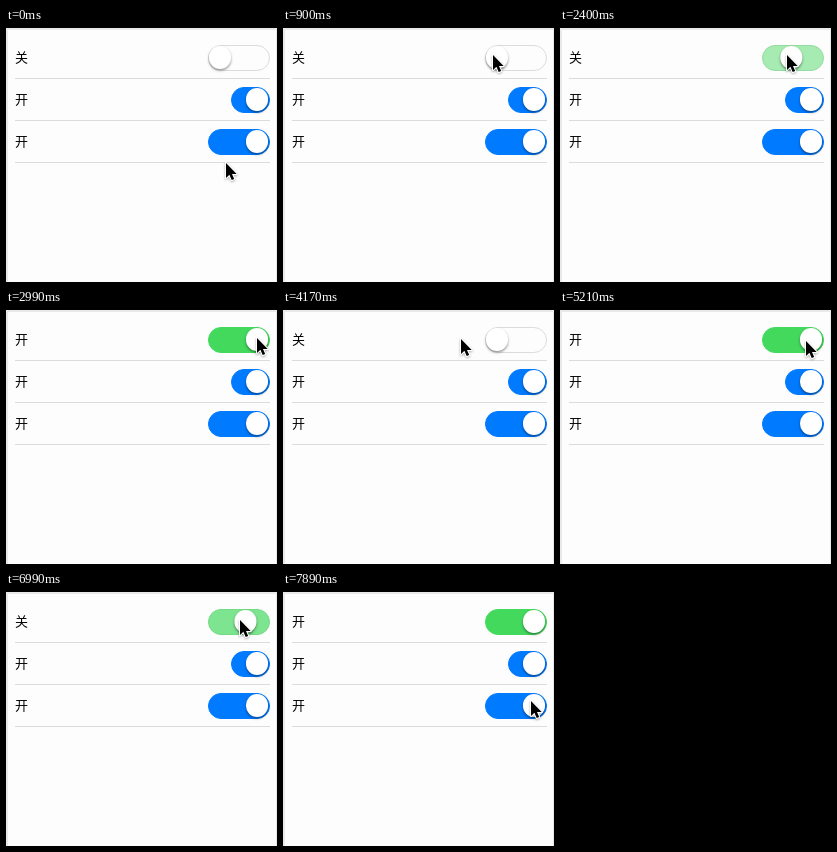
Recreate the animation shown at these times as an HTML page. Size 271 by 254 pixels, loop 8000 ms.

```html
<!DOCTYPE html>
<html lang="zh-CN">
<head>
<meta charset="utf-8">
<title>Switches</title>
<style>
  html, body { margin: 0; width: 100%; height: 100%; overflow: hidden; }
  #stage {
    position: relative; box-sizing: border-box; width: 271px; height: 254px; overflow: hidden;
    background: #fdfdfd; border: solid #e9e9e9; border-width: 2px 1px 0 2px;
  }
  .row {
    position: absolute; left: 7px; width: 255px; height: 42px;
    box-sizing: border-box; border-bottom: 1.5px solid #dcdcdc;
  }
  .label {
    position: absolute; left: 0; top: 10px; line-height: 20px; color: #000;
    font-family: "Noto Sans CJK SC", "Noto Sans CJK", sans-serif; font-size: 13px;
  }
  .track {
    position: absolute; right: 0; top: 8px; height: 25.5px; box-sizing: border-box;
    border-radius: 13px; border: 1.5px solid;
  }
  .knob {
    position: absolute; left: 0; top: 0; width: 22.5px; height: 22.5px; border-radius: 50%;
    background: #fff; box-shadow: 0 1.5px 2.5px rgba(0, 0, 0, .42);
  }
  #cursor { position: absolute; left: -2px; top: -2px; overflow: visible; }
</style>
</head>
<body>
<div id="stage">
  <svg id="cursor" width="12" height="19">
    <path d="M0 0V15L3.4 11.8L5.7 17L8.2 16L6 11H10.7Z" fill="#000" stroke="#fff"
      stroke-width="2" stroke-linejoin="round" paint-order="stroke"
      style="filter: drop-shadow(0 1px 1px rgba(0,0,0,.3))"/>
  </svg>
</div>
<script>
  const LOOP = 8000, TICK = 150;
  const stage = document.getElementById('stage');
  const cursor = document.getElementById('cursor');
  const OFF = [253, 253, 253], EDGE = [220, 220, 220];
  const GREEN = [67, 217, 93], BLUE = [0, 122, 255];

  // Each move: start time, number of ticks, from x, y, to x, y, then label and drag state
  const moves = [
    [0, 4, 220, 135, 204, 27, 'off'],
    [900, 3, 210, 27, 240, 27, 'off'],
    [1650, 2, 227, 27, 212, 27, 'off'],
    [2250, 3, 217, 27, 247, 28, 'off', 'drag'],
    [2840, 1, 250, 28, 251, 28, 'on'],
    [3280, 4, 256, 30, 204, 29, 'on', 'drag'],
    [4020, 1, 189, 29, 178, 29, 'off'],
    [4310, 1, 205, 30, 205, 30, 'off'],
    [4460, 1, 230, 31, 230, 31, 'on'],
    [4910, 2, 255, 38, 246, 31, 'on'],
    [5510, 1, 228, 34, 212, 36, 'on', 'drag'],
    [6100, 1, 220, 60, 223, 67, 'off'],
    [6390, 1, 212, 28, 212, 28, 'off'],
    [6840, 2, 222, 28, 246, 28, 'off', 'drag'],
    [7440, 3, 249, 44, 248, 109, 'on']
  ];

  const lerp = (a, b, p) => a + (b - a) * p;
  const clamp = v => Math.min(1, Math.max(0, v));
  const mix = (a, b, p) => `rgb(${a.map((v, i) => Math.round(lerp(v, b[i], p)))})`;

  function add(parent, cls) {
    const el = document.createElement('div');
    el.className = cls;
    parent.append(el);
    return el;
  }

  function makeSwitch(index, width, color) {
    const row = add(stage, 'row');
    row.style.top = 7 + index * 42 + 'px';
    const label = add(row, 'label');
    const track = add(row, 'track');
    const knob = add(track, 'knob');
    track.style.width = width + 'px';
    return (p, on) => {
      label.textContent = on ? '开' : '关';
      track.style.background = mix(OFF, color, p);
      track.style.borderColor = mix(EDGE, color, p);
      knob.style.transform = `translateX(${p * (width - 25.5)}px)`;
    };
  }

  const setTop = makeSwitch(0, 62.5, GREEN);
  makeSwitch(1, 39.5, BLUE)(1, true);
  makeSwitch(2, 62.5, BLUE)(1, true);
  stage.append(cursor);

  const start = performance.now();

  function draw(now) {
    const t = Math.max(0, now - start) % LOOP;
    const [from, ticks, x0, y0, x1, y1, label, drag] = moves.findLast(m => m[0] <= t);
    // Slight lead, since ticks run a little short of their nominal length
    const k = clamp(Math.floor((t - from + 10) / TICK) / ticks);
    const x = Math.round(lerp(x0, x1, k)), y = Math.round(lerp(y0, y1, k));
    const on = label === 'on';
    cursor.style.transform = `translate(${x}px, ${y}px)`;
    setTop(drag ? clamp((x - 212) / 32) : Number(on), on);
    requestAnimationFrame(draw);
  }
  draw(start);
</script>
</body>
</html>
```
